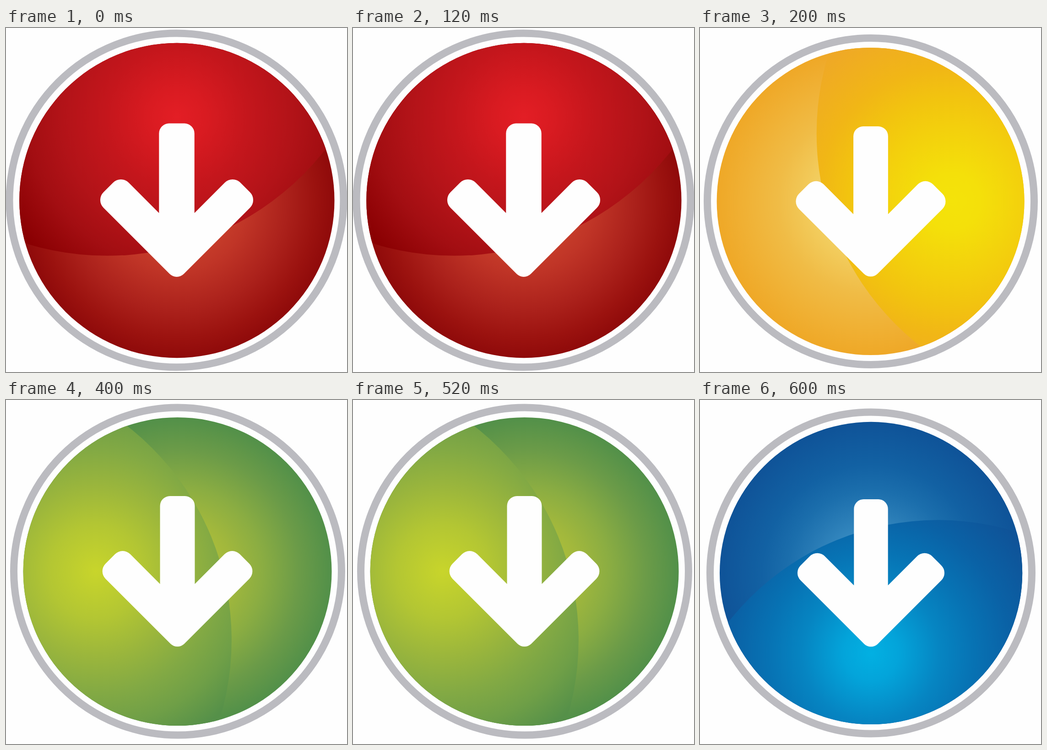
An HTML page that plays this animation: 745 px wide and 752 px high, repeating every 800 ms.

```html
<!DOCTYPE html>
<html lang="en">
<head>
<meta charset="utf-8">
<title>Colour button</title>
<style>
html, body { margin: 0; width: 100%; height: 100%; overflow: hidden; background: #fefefe; }
svg { display: block; width: 100%; height: 100%; }
</style>
</head>
<body>
<svg id="stage" viewBox="0 0 745 752"></svg>
<script>
const STEP = 200;

// ring and disc: [cx, cy, r]; arrow: [centre x, top, scale]; stops: [offset, colour]
const buttons = [
  { ring: [372.5, 376.5, 373], disc: [373.4, 377, 344.2], arrow: [373, 208.5, 1], turn: 0,
    gloss: [[0, '#e31e25'], [.15, '#d91b21'], [.37, '#c4161c'], [.6, '#b21318'], [.77, '#a30e12'], [1, '#8a0002']],
    base: [[.3, '#c83f2b'], [.45, '#c03527'], [.7, '#ab211b'], [.88, '#9b120f'], [1, '#8f0a0a']] },
  { ring: [373, 379, 365], disc: [372.6, 379, 336], arrow: [373, 215, .979], turn: 90,
    gloss: [[0, '#f4e30a'], [.15, '#f4e00a'], [.4, '#f3cf0d'], [.55, '#f2c40f'], [.72, '#f1b616'], [1, '#efa926']],
    base: [[.25, '#f3d46a'], [.4, '#f2cb5b'], [.6, '#f0bc46'], [.8, '#f0b236'], [1, '#efa827']] },
  { ring: [375, 374.6, 366], disc: [374.6, 375, 337], arrow: [374.5, 210, .981], turn: -90,
    gloss: [[0, '#c8d52b'], [.25, '#b3c633'], [.45, '#9bb63c'], [.65, '#82a944'], [.82, '#6f9f47'], [1, '#559049']],
    base: [[.25, '#aabd3b'], [.35, '#a2b83c'], [.55, '#8bad42'], [.79, '#6b9b48'], [1, '#529049']] },
  { ring: [373.5, 378, 359.5], disc: [373.6, 378.4, 330.6], arrow: [373.5, 217, .961], turn: 180,
    gloss: [[0, '#02b0e2'], [.15, '#03a4da'], [.37, '#0685c2'], [.55, '#0773b4'], [.75, '#0a62a6'], [1, '#0f5398']],
    base: [[.28, '#3488bf'], [.4, '#297cb6'], [.55, '#1b6eac'], [.72, '#1261a3'], [1, '#0f5398']] }
];

const ARROW = `M-38.7 196V22a22 22 0 0 1 22-22H16.7a22 22 0 0 1 22 22V196
  L105 129.5a24 24 0 0 1 34 0L160 150.5a24 24 0 0 1 0 34L15.5 329a22 22 0 0 1-31 0
  L-160 184.5a24 24 0 0 1 0-34L-139 129.5a24 24 0 0 1 34 0Z`;

const svg = document.getElementById('stage');

const gradient = (id, cy, r, stops) =>
  `<radialGradient id="${id}" gradientUnits="userSpaceOnUse" cx="0" cy="${cy}" r="${r}">` +
  stops.map(([at, colour]) => `<stop offset="${at}" stop-color="${colour}"/>`).join('') +
  '</radialGradient>';

// The disc is drawn as a unit circle, turned by quarter turns.
function drawButton({ ring, disc, arrow, turn, gloss, base }, i) {
  const [x, y, r] = ring;
  const [dx, dy, dr] = disc;
  const [ax, ay, size] = arrow;
  return `<g class="button">
    <defs>${gradient('base' + i, 0, 1, base)}${gradient('gloss' + i, -.53, 1.22, gloss)}</defs>
    <circle cx="${x}" cy="${y}" r="${r - 8}" fill="#fefefe" stroke="#bbbbc0" stroke-width="16"/>
    <g transform="translate(${dx} ${dy}) rotate(${turn}) scale(${dr})">
      <circle r="1" fill="url(#base${i})"/>
      <g clip-path="url(#round)">
        <circle cx="-.443" cy="-1.409" r="1.76" fill="url(#gloss${i})"/>
      </g>
    </g>
    <path d="${ARROW}" transform="translate(${ax} ${ay}) scale(${size})" fill="#fefefe"/>
  </g>`;
}

svg.innerHTML =
  '<defs><clipPath id="round"><circle r="1"/></clipPath></defs>' +
  buttons.map(drawButton).join('');

const count = buttons.length;
svg.querySelectorAll('.button').forEach((el, i) => {
  el.animate([
    { opacity: 1, offset: 0, easing: 'step-end' },
    { opacity: 0, offset: 1 / count, easing: 'step-end' },
    { opacity: 0, offset: 1 }
  ], { duration: STEP * count, delay: STEP * (i - count), iterations: Infinity });
});
</script>
</body>
</html>
```
